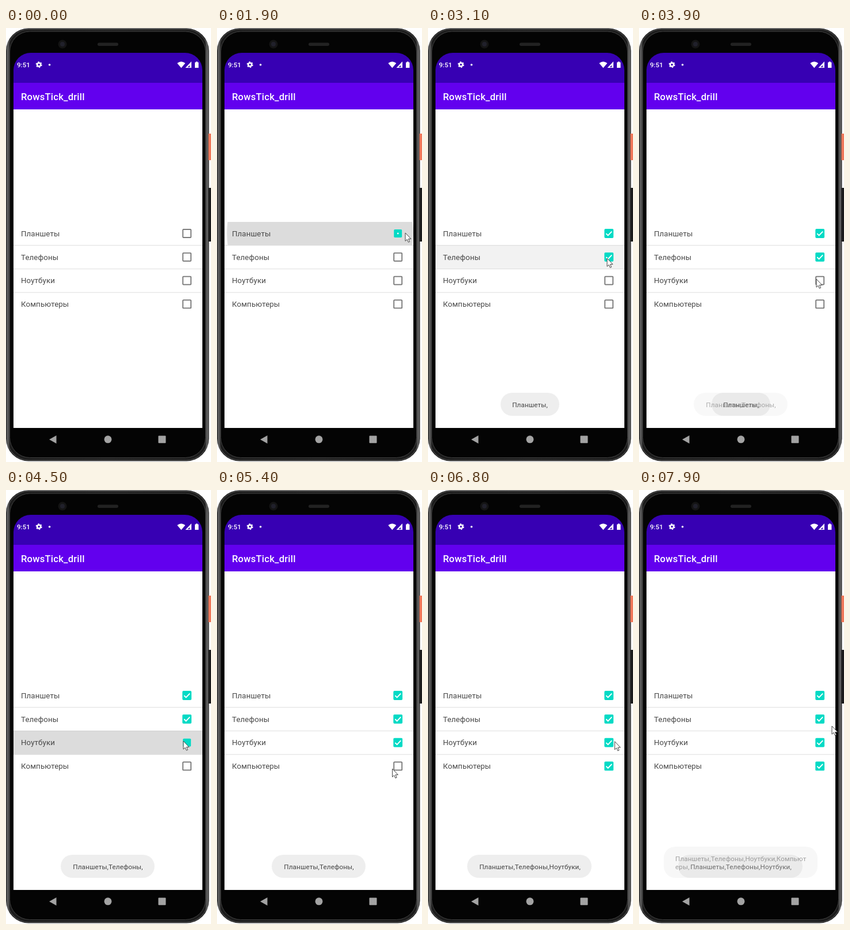
These frames come from a looping animation (356x752 px, 8 s). An HTML page:

```html
<!DOCTYPE html>
<html lang="ru">
<head>
<meta charset="utf-8">
<title>Checklist</title>
<style>
  html, body { margin: 0; width: 100%; height: 100%; overflow: hidden; background: #fff; }
  svg { display: block; width: 100%; height: 100%; }
  text { font-family: Roboto, sans-serif; }
  .row { font-size: 13.3px; letter-spacing: .1px; fill: #484848; }
  .toast { font-size: 11.7px; letter-spacing: .1px; fill: #444; }
</style>
</head>
<body>
<svg id="stage" viewBox="0 0 356 752">
  <defs>
    <linearGradient id="rim" x1="0" x2="1" y1="0" y2="0">
      <stop offset="0" stop-color="#2a2a2a"/>
      <stop offset=".009" stop-color="#666"/>
      <stop offset=".02" stop-color="#1b1b1b"/>
      <stop offset=".5" stop-color="#222"/>
      <stop offset=".98" stop-color="#1b1b1b"/>
      <stop offset=".991" stop-color="#666"/>
      <stop offset="1" stop-color="#2a2a2a"/>
    </linearGradient>
  </defs>

  <!-- phone -->
  <rect x="0" y="0.5" width="352.5" height="750" rx="39" fill="url(#rim)"/>
  <rect x="2" y="2" width="348.5" height="747" rx="37.5" fill="none" stroke="#585858"/>
  <rect x="6.5" y="6" width="340" height="738.5" rx="35" fill="#040404" stroke="#404040"/>
  <rect x="351.5" y="183" width="5" height="46" fill="#f0795b"/>
  <rect x="351.5" y="277" width="5" height="93" fill="#1c1c1c"/>
  <circle cx="98" cy="28" r="7.5" fill="#141414"/>
  <circle cx="98" cy="28" r="4" fill="#20202a"/>
  <rect x="159" y="25.5" width="36" height="5.5" rx="2.7" fill="#222"/>

  <!-- app -->
  <path d="M13 95V73A30 30 0 0 1 43 43H311A30 30 0 0 1 341 73V95Z" fill="#3700b3"/>
  <rect x="13" y="95" width="328" height="46" fill="#6200ee"/>
  <rect x="13" y="141" width="328" height="552" fill="#fff"/>
  <text x="26" y="125" font-size="16.6" font-weight="500" letter-spacing=".2" fill="#fff">RowsTick_drill</text>

  <!-- status bar -->
  <g fill="#fff">
    <text x="19" y="68" font-size="11.6" font-weight="500">9:51</text>
    <circle cx="57.2" cy="63.5" r="3" fill="none" stroke="#fff" stroke-width="2.6"/>
    <circle cx="57.2" cy="63.5" r="4.7" fill="none" stroke="#fff" stroke-width="1.6" stroke-dasharray="2.46 2.46"/>
    <circle cx="75.6" cy="63.7" r="1.8"/>
    <path d="M297.3 61Q304.3 55.5 311.3 61L304.3 69.3Z"/>
    <path d="M322 58V69H311.5Z"/>
    <path d="M319 64.5V68H315.6Z" fill="#3700b3"/>
    <path d="M328 59.6H329.8V58.2H332.6V59.6H334.4V69H328Z"/>
  </g>

  <!-- navigation -->
  <g fill="#a3a3a3">
    <path d="M75 713L87.5 706V720Z"/>
    <circle cx="177" cy="712.8" r="6.5"/>
    <rect x="264.5" y="706.5" width="13" height="12.7" rx="1"/>
  </g>

  <g id="rows"></g>
  <g id="toasts"></g>
  <path id="cursor" d="M0 0V14.2L3.2 11.3L5.3 16.2L7.6 15.2L5.5 10.4H9.9Z"
        fill="#fff" stroke="#444" stroke-width="1" stroke-linejoin="round"/>
</svg>
<script>
const NS = 'http://www.w3.org/2000/svg';
const LOOP = 8000, STEP = 100;
const names = ['Планшеты', 'Телефоны', 'Ноутбуки', 'Компьютеры'];
const taps = [1795, 2761, 4350, 6318];
const toastTimes = [2000, 3810, 5810, 7795];
// left edge, width, top, height
const pills = [[126, 102, 632, 40], [95, 163, 632, 40], [68, 216, 632, 40], [43, 267, 618, 54]];
// time, x, y of the pointer tip
const path = [
  [1600, 331, 368], [1700, 327, 355], [2100, 327, 355], [2400, 312, 388],
  [2600, 311, 399], [3200, 311, 399], [3600, 308, 435], [4500, 308, 435],
  [5000, 304.5, 483], [6500, 304.5, 483], [7000, 335, 410], [7100, 335, 410], [7200, 335, 409]
];

const clamp = v => Math.max(0, Math.min(1, v));
const $ = id => document.getElementById(id);

function set(el, attrs) {
  for (const k in attrs) el.setAttribute(k, attrs[k]);
  return el;
}

function add(parent, tag, attrs, text) {
  const el = set(document.createElementNS(NS, tag), attrs);
  if (text) el.textContent = text;
  return parent.appendChild(el);
}

const rows = names.map((name, i) => {
  const mid = 356 + i * 40.8, top = mid - 20;
  const g = add($('rows'), 'g', {});
  const clip = add(g, 'clipPath', { id: 'clip' + i });
  add(clip, 'rect', { x: 13, y: top, width: 328, height: 40.8 });
  const wave = add(add(g, 'g', { 'clip-path': `url(#clip${i})` }), 'circle', {});
  if (i < 3) add(g, 'rect', { x: 13, y: top + 40.1, width: 328, height: 1, fill: '#dedede' });
  add(g, 'text', { class: 'row', x: 26, y: mid + 4.8 }, name);
  const box = add(g, 'g', {});
  const back = add(box, 'rect', { x: -7.9, y: -7.9, width: 15.8, height: 15.8, rx: 1.9 });
  const hole = add(box, 'rect', { fill: '#fff' });
  const tick = add(box, 'path', {
    d: 'M-4.9 .2L-1.6 3.5L5 -3.4', fill: 'none', stroke: '#fff', 'stroke-width': 1.9,
    pathLength: 1, 'stroke-dasharray': '1 2'
  });
  return { mid, wave, box, back, hole, tick };
});

const toasts = pills.map(([x, width, y, height], i) => {
  const g = add($('toasts'), 'g', {});
  add(g, 'rect', { x, y, width, height, rx: 20, 'fill-opacity': .067 });
  const label = names.slice(0, i + 1).join(',') + ',';
  if (i < 3) {
    add(g, 'text', { class: 'toast', x: 177, y: 657, 'text-anchor': 'middle' }, label);
  } else {
    add(g, 'text', { class: 'toast', x: 63, y: 643 }, label.slice(0, -4));
    add(g, 'text', { class: 'toast', x: 63, y: 657 }, label.slice(-4));
  }
  return g;
});

function drawRow(row, e) {
  // ripple grows from the touch point towards the row centre
  const rest = (1 - clamp(e / 120)) ** 2;
  const fade = clamp(e / 80) ** 1.25 * (1 - clamp((e - 150) / 300));
  set(row.wave, {
    cx: 177 + 130 * rest,
    cy: row.mid - 38 * rest,
    r: 164 - 138 * rest + Math.max(0, e - 120) * .1,
    'fill-opacity': .137 * fade
  });

  // hole closes, then the tick is drawn
  const on = e > 40;
  const close = clamp((e - 40) / 80);
  const draw = clamp((e - 160) / 140);
  const half = e < 125 ? Math.max(1.4, 6.1 * (1 - close) ** 1.4) : 0;
  const scale = 1 - .12 * Math.min(1, close * 2) * (1 - draw);
  set(row.box, { transform: `translate(314.2 ${row.mid}) scale(${scale})` });
  set(row.back, { fill: on ? '#03dac5' : '#757575' });
  set(row.hole, { x: -half, y: -half, width: 2 * half, height: 2 * half });
  set(row.tick, { 'stroke-dashoffset': 1 - draw, opacity: draw > 0 ? 1 : 0 });
}

function toastAlpha(i, t) {
  const shown = 1 - (1 - clamp((t - toastTimes[i]) / 360)) ** 2;
  const gone = i < 3 ? clamp((t - toastTimes[i + 1] - 60) / 200) : 0;
  return shown * (1 - gone);
}

function drawCursor(t) {
  const n = path.findIndex(p => p[0] > t);
  const b = n < 0 ? path[path.length - 1] : path[n];
  const a = n > 0 ? path[n - 1] : b;
  const k = a === b ? 0 : (t - a[0]) / (b[0] - a[0]);
  const s = k * k * (3 - 2 * k);
  const x = a[1] + (b[1] - a[1]) * s, y = a[2] + (b[2] - a[2]) * s;
  set($('cursor'), { transform: `translate(${x} ${y})`, opacity: t < path[0][0] ? 0 : 1 });
}

function render(t) {
  rows.forEach((row, i) => drawRow(row, t - taps[i]));
  toasts.forEach((g, i) => set(g, { opacity: toastAlpha(i, t) }));
  drawCursor(t);
}

function frame() {
  const t = (performance.now() + 5) % LOOP;
  render(Math.floor(t / STEP) * STEP);
  requestAnimationFrame(frame);
}
frame();
</script>
</body>
</html>
```
